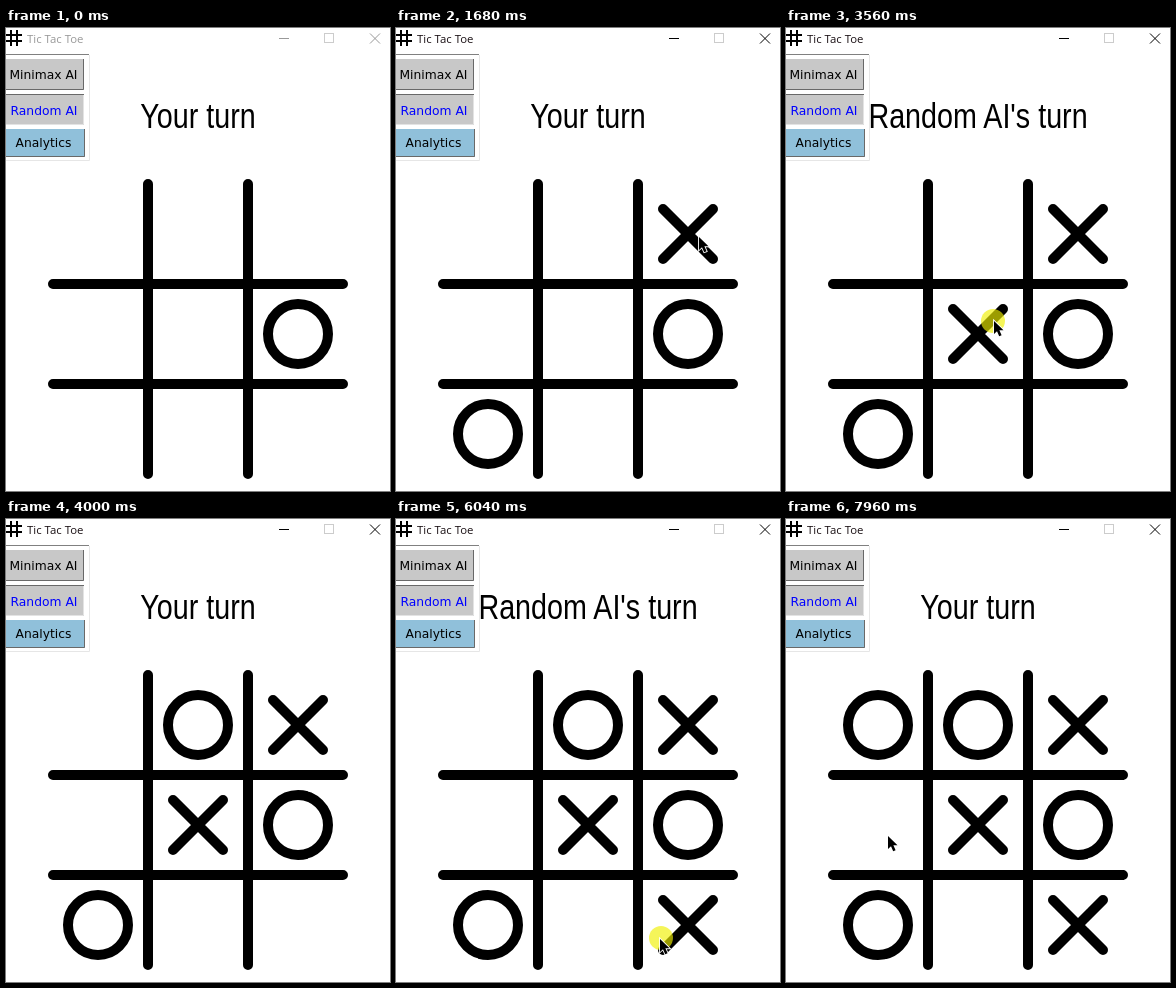
Animation, 384 px wide and 463 px high, one loop 8 s. Source, as an HTML page:

```html
<!DOCTYPE html>
<html lang="en">
<head>
<meta charset="utf-8">
<title>Tic Tac Toe</title>
<style>
  html, body { margin: 0; width: 100%; height: 100%; overflow: hidden; background: #fff; }
  svg { display: block; width: 100%; height: 100%; }
  .btn { font: 12.3px "DejaVu Sans", sans-serif; text-anchor: middle; }
  .bar { font: 11.4px "Open Sans", sans-serif; }
  .status { font: 35px "Liberation Sans", Arial, sans-serif; text-anchor: middle; }
</style>
</head>
<body>
<svg viewBox="0 0 384 463">
  <rect width="384" height="463" fill="#fff"/>

  <!-- title bar -->
  <path d="M5 2V18M11 2V18M0 7H16M0 13H16" stroke="#000" stroke-width="2"/>
  <text id="caption" class="bar" x="21" y="15">Tic Tac Toe</text>
  <path id="controls" d="M273 10.5H283M364 5.5L374 15.5M374 5.5L364 15.5" fill="none"/>
  <rect x="318.5" y="5.5" width="9" height="9" fill="none" stroke="#ccc"/>

  <!-- button panel -->
  <path d="M0 26.5H83" stroke="#808080"/>
  <path d="M83.5 27V132.5H0" stroke="#e6e6e6" fill="none"/>
  <rect y="31" width="78" height="31" fill="#c8c8c8"/>
  <path d="M77.5 31V61.5H0" stroke="#696969" fill="none"/>
  <rect y="66" width="78" height="31" fill="#c8c8c8"/>
  <path d="M0 66.5H78" stroke="#696969"/>
  <path d="M77.5 67V96.5H0" stroke="#e3e3e3" fill="none"/>
  <rect y="101" width="79" height="28" fill="#90c0da"/>
  <path d="M78.5 101V128.5H0" stroke="#696969" fill="none"/>
  <text class="btn" x="37.5" y="51">Minimax AI</text>
  <text class="btn" x="38" y="87" fill="#00f">Random AI</text>
  <text class="btn" x="37.5" y="119">Analytics</text>

  <text id="status" class="status" transform="translate(192 99.5) scale(.82 1)"></text>

  <!-- board -->
  <path d="M142 156V446M242 156V446M47 256H337M47 356H337"
        stroke="#000" stroke-width="10" stroke-linecap="round"/>
  <g id="marks" fill="none" stroke="#000" stroke-width="10" stroke-linecap="round"></g>

  <circle id="glow" r="12" fill="#f0f000" fill-opacity=".65"/>
  <path id="cursor" d="M0 0V13L3 10.2L5.2 15.2L7.6 14.2L5.4 9.3H9.5Z"
        stroke="#fff" stroke-width="1.8" paint-order="stroke"/>
</svg>
<script>
const LOOP = 8000;
const $ = id => document.getElementById(id);
const show = (el, on) => el.setAttribute("visibility", on ? "visible" : "hidden");

// [time, mark, column, row]
const moves = [
  [0, "O", 2, 1], [1240, "X", 2, 0], [1680, "O", 0, 2], [3560, "X", 1, 1],
  [4000, "O", 1, 0], [6040, "X", 2, 2], [6600, "O", 0, 0]
];

// pointer visits: shown from..to, along a curve [start, control, end] in steps
const trips = [
  { from: 520, to: 2680, start: 520, step: 80, n: 6, pts: [[308, 346], [304, 122], [303, 209]] },
  { from: 2680, to: 3800, start: 2600, step: 80, n: 8, pts: [[303, 209], [245, 266], [208, 293]] },
  { from: 3800, to: 4000, start: 3800, step: 100, n: 1, pts: [[209, 312], [212, 360], [215, 410]] },
  { from: 5240, to: 6400, start: 5286, step: 72, n: 6, pts: [[245, 441], [258, 424], [264, 420]] },
  { from: 7440, to: LOOP, start: 7440, step: 74, n: 7, pts: [[209, 450], [125, 350], [102, 317]] }
];

// [on, off, x, y]
const clicks = [[1240, 1440, 302, 209], [3560, 3800, 207, 293], [6040, 6280, 265, 419]];

const marks = moves.map(([at, mark, col, row]) => {
  const el = document.createElementNS("http://www.w3.org/2000/svg", "path");
  el.setAttribute("d", mark === "X"
    ? "M-25-25L25 25M25-25L-25 25"
    : "M-30 0A30 30 0 1 1 30 0A30 30 0 1 1-30 0Z");
  el.setAttribute("transform", `translate(${92 + col * 100} ${206 + row * 100})`);
  $("marks").append(el);
  return { el, at, mark };
});

function pointAt({ start, step, n, pts: [a, b, c] }, t) {
  const k = Math.max(0, Math.min(n, Math.floor((t - start) / step)));
  const p = k / n, q = 1 - p;
  return [0, 1].map(i => q * q * a[i] + 2 * p * q * b[i] + p * p * c[i]);
}

function draw(t) {
  const active = t >= 1240;
  $("caption").setAttribute("fill", active ? "#1a1014" : "#999");
  $("controls").setAttribute("stroke", active ? "#000" : "#999");

  let last = "O";
  for (const { el, at, mark } of marks) {
    show(el, t >= at);
    if (t >= at) last = mark;
  }
  const label = last === "X" ? "Random AI's turn" : "Your turn";
  if ($("status").textContent !== label) $("status").textContent = label;

  const click = clicks.find(([on, off]) => t >= on && t < off);
  show($("glow"), click);
  if (click) $("glow").setAttribute("transform", `translate(${click[2]} ${click[3]})`);

  const trip = trips.find(s => t >= s.from && t < s.to);
  show($("cursor"), trip);
  if (trip) {
    const [x, y] = pointAt(trip, t).map(Math.round);
    $("cursor").setAttribute("transform", `translate(${x} ${y})`);
  }
}

const t0 = performance.now();
function tick() {
  draw((performance.now() - t0) % LOOP);
  requestAnimationFrame(tick);
}
tick();
</script>
</body>
</html>
```
